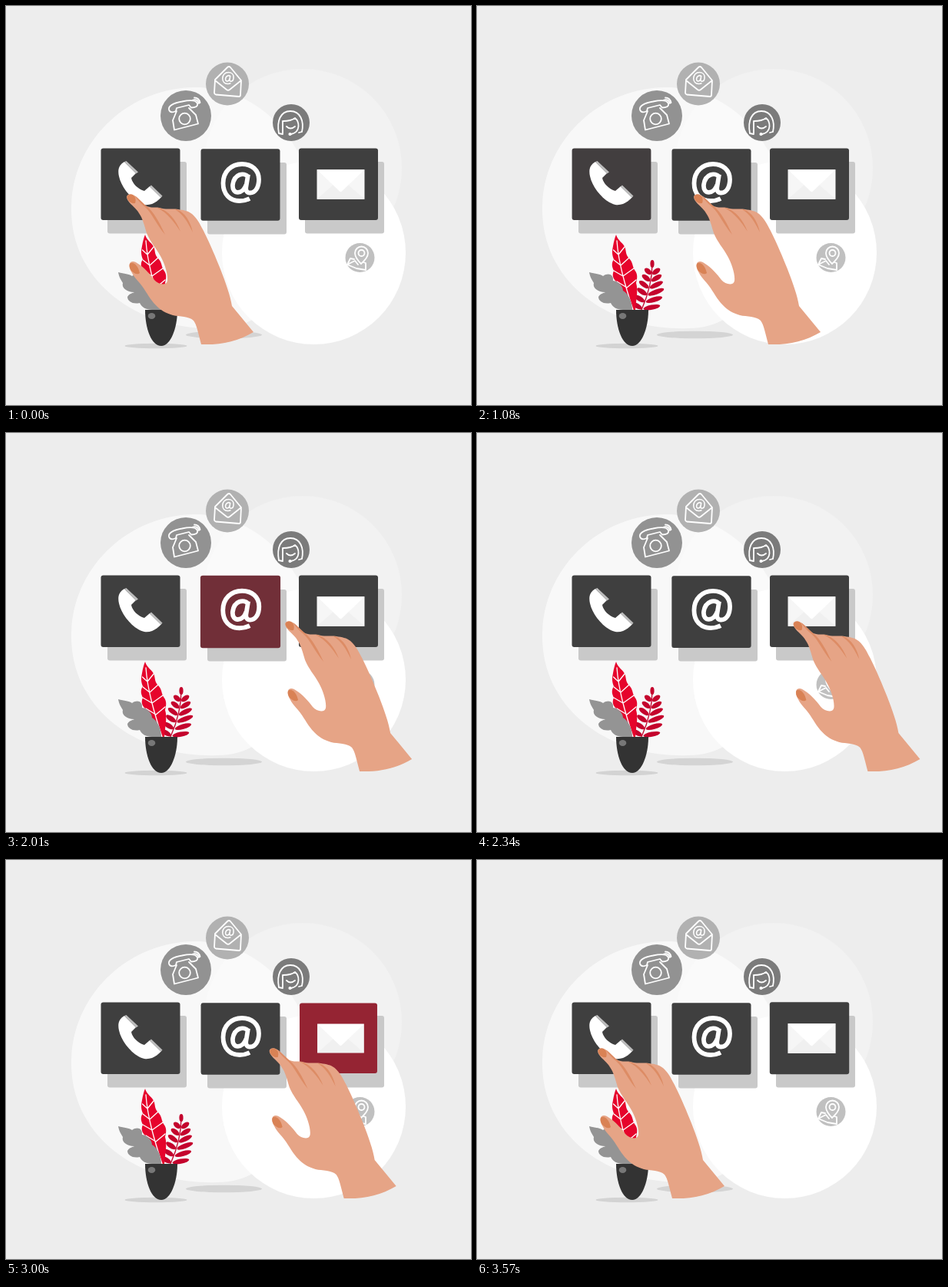
An HTML page that plays this animation: 605 by 520 pixels, repeating every 3.6 s.

```html
<!DOCTYPE html>
<html lang="en">
<head>
<meta charset="utf-8">
<title>Contact options</title>
<style>
html, body { margin: 0; width: 100%; height: 100%; overflow: hidden; background: #ededed; }
svg { display: block; }
.line { fill: none; stroke: #fff; stroke-width: 1.8; stroke-linecap: round; stroke-linejoin: round; }
.vein { stroke-width: 1.3; }
</style>
</head>
<body>
<svg width="605" height="520" viewBox="0 0 605 520">
  <defs>
    <path id="at" fill="none" stroke="#fff" d="M317 251C312 253.500 308 254 304 254C291 254 282.500 245 282.500 231C282.500 216 293 206 307 206C320 206 329 214 329 226C329 237 324 243.500 317.500 243.500C313 243.500 311.500 240 312.500 235L315 219.500M314.500 222C310 217 297 218 295 233C294 246.500 308 246 312.500 233"/>
  </defs>

  <!-- backdrop -->
  <circle cx="386" cy="211" r="129" fill="#f2f2f2"/>
  <path fill="#fff" opacity=".65" d="M85 265C85 175 160 106 247 106C325 106 385 170 397 240C400 340 350 420 275 420C175 424 85 362 85 265Z"/>
  <circle cx="400.500" cy="321.500" r="119.500" fill="#fff"/>

  <!-- contact badges -->
  <circle cx="234" cy="143" r="33" fill="#929292"/>
  <g class="line">
    <path d="M212 135C211 129 221 126 229 124.500C238 122.500 247 122 249 127C250 131 246 132.500 241 132.500L238 129L222 133L221 137C217 139 213 139 212 135ZM222 137L217 149L219 161.500L250 153.500L247 142L238 133M243 122.500Q249 121 251 127M245 119.500Q251 119.500 252.500 126"/>
    <circle cx="232.500" cy="147" r="7.300"/>
  </g>
  <circle cx="288" cy="101.500" r="28" fill="#b1b1b1"/>
  <g class="line">
    <path d="M272 96L288 80Q290 78 292 80L306 97L305 116Q305 118 303 118L273 115.500Q271 115 271 113ZM272 97L287 109Q289 110.500 291 109L306 97"/>
  </g>
  <use href="#at" stroke-width="5" transform="translate(289 94) scale(.31) translate(-306 -230)"/>
  <circle cx="371" cy="152" r="24" fill="#7b7b7b"/>
  <g class="line">
    <path d="M360 167L355 166C352 150 357 137 370 137C383 137 388 150 385 164L381 165M360 166V150Q371 150 376 146Q381 150 380.500 157C380 163 376 166 371 167M365 157Q370 162 376 157"/>
    <circle cx="369.500" cy="167" r="1.200" fill="#fff"/>
  </g>
  <circle cx="460.500" cy="328" r="19" fill="#c0c0c0"/>
  <g class="line">
    <path d="M462 336C457 331 454 327 454 322A8 8 0 0 1 471 322C471 327 467 331 462 336ZM453 330L448 329L444 337L456 342L468 344L468 335L465 334M444 337L454 332L458 337"/>
    <circle cx="462.500" cy="322" r="4"/>
  </g>

  <!-- card shadows -->
  <g fill="#c9c9c9">
    <rect x="132" y="203" width="103" height="93.500" rx="3"/>
    <rect x="262" y="204" width="103" height="93.500" rx="3"/>
    <rect x="389" y="203" width="103" height="93.500" rx="3"/>
  </g>

  <!-- cards -->
  <g class="card">
    <rect x="123.500" y="185.500" width="103" height="93.500" rx="3"/>
    <path fill="#fff" d="M154 203L169 218L163 224C164 231 172 239 180 241L187 235L202 249C195 257 188 260 180 259C166 256 150 237 147 222C145 213 147 207 154 203Z"/>
    <path fill="#bcbcbc" d="M154 203L156.500 202L172 216.500L169 218.500ZM186.500 235.500L189 233.500L203.500 247.500L201.500 250Z"/>
  </g>
  <g class="card">
    <rect x="253.500" y="186.300" width="103" height="93.500" rx="3"/>
    <use href="#at" stroke-width="5.800"/>
  </g>
  <g class="card">
    <rect x="381" y="185.500" width="103" height="93.500" rx="3"/>
    <rect x="404.500" y="213.300" width="62" height="38.400" fill="#f6f6f6"/>
    <path fill="#f0f0f0" d="M404.500 251.700L426 233H445L466.500 251.700Z"/>
    <path fill="#fff" d="M404.500 213.300H466.500L437 241.500Q435.500 243 434 241.500Z"/>
  </g>

  <!-- plant -->
  <ellipse cx="195" cy="443" rx="40.500" ry="3.300" fill="#d3d3d3"/>
  <ellipse cx="283.500" cy="428.500" rx="49.500" ry="4.800" fill="#d4d4d4"/>
  <g id="fern" fill="#c4042d"><path d="M228 336C228 358 222 378 214 396" fill="none" stroke="#c4042d" stroke-width="1.300"/></g>
  <path fill="#e6042c" d="M181 298C183 306 191 309 193 316C194 321 194 325 198 329C203 334 202 339 205 344C210 350 208 356 207 361C210 371 207 382 206 396H202C199 386 194 380 190 374C185 369 185 364 181 359C176 354 176 350 178 345C175 339 175 335 178 330C175 323 176 318 177 313C178 307 179 303 181 298Z"/>
  <path class="line vein" d="M182 306C184 335 193 365 203 396M184 324L177.500 318M184 324L192 314M187 338L178 331M187 338L198 328M190 352L178 345M190 352L204 342M195 367L182 359M195 367L207 357"/>
  <path fill="#949494" d="M146 347C154 349 160 349 164 352C171 347 178 350 177 358C184 359 190 365 190 371C197 375 202 385 202 396H190C182 396 176 392 174 387C165 389 158 385 158 379C160 375 165 374 167 373C157 373 150 367 152 361C149 356 147 353 146 347Z"/>
  <path fill="#333" d="M181 396H223C223 420 214 443 202 443C189 443 181 420 181 396Z"/>
  <ellipse cx="189.500" cy="404" rx="4.800" ry="4" fill="#777"/>

  <g id="hand">
    <path fill="#e6a486" d="M157 249C157 245 163 244 167 247C172 250 177 256 181 260C188 264 194 261.500 200 263C208 266 216 263.500 224 265C231 266 237 267 242 271C250 278 253 286 257 293C266 311 273 328 279 343C286 361 292 378 294 391L322 425C302 437 279 442 254 441C250 426 248 415 244 410C238 404 226 405 217 403C207 400 201 396 195 390C187 382 183 373 177 365C172 358 167 354 164 348C161 343 159 338 162 334C165 332 168 333 172 336C180 341 187 349 193 357C198 363 209 365 210 358C211 349 206 335 201 326C195 315 188 308 183 296C180 286 178 277 173 270C169 262 158 257 157 249Z"/>
    <path fill="#d98255" d="M157.500 249C158 245 164 244 167 248C169 250 169 254 168 257C163 258 158 254 157.500 249ZM161 336C165 332 172 338 174 348C171 351 166 348 163 345C161 342 160 339 161 336Z"/>
    <path fill="#dd8c65" d="M167 247C172 250 177 256 183 261C193 269 200 283 207 298C195 284 190 270 181 262C176 258 171 253 167 247ZM199 263C211 267 221 278 227 294C218 280 210 270 197 263ZM222 265C233 269 240 281 243 295C236 281 231 272 220 265Z"/>
  </g>
</svg>
<script>
const LOOP = 3600, STEP = 30, HOLD = 300;
const RELEASES = [300, 1500, 2700];
const CENTERS = [[175, 232], [305, 233], [432.5, 232]];
const STOPS = [0, 131.4, 256, 0];
const TRAVEL = [900, 900, 870];
const DARK = [63, 63, 63], RED = [200, 20, 44];
const cards = document.querySelectorAll('.card');
const hand = document.getElementById('hand');
const clamp = v => Math.min(1, Math.max(0, v));
const ease = u => u * u * (3 - 2 * u);

function growFern() {
  let leaves = '<ellipse cx="228" cy="336" rx="2.600" ry="5"/>';
  for (let i = 0; i < 6; i++) {
    const x = 227.5 - i * 1.3 - i * i * 0.22, y = 350 + i * 9;
    for (const side of [-1, 1]) {
      const size = side < 0 ? 5.5 + Math.min(i, 2) : 6 + Math.min(i, 3) * 1.7;
      const angle = side < 0 ? 40 - i * 2 : -36 + i * 5;
      leaves += `<ellipse cx="${side * (size + 1)}" rx="${size}" ry="3.200" transform="translate(${x} ${y}) rotate(${angle})"/>`;
    }
  }
  document.getElementById('fern').insertAdjacentHTML('beforeend', leaves);
}

// Dips while pressed, then rings out like a spring.
function pressScale(age) {
  if (age < -HOLD) return 1;
  if (age < 0) return 0.9 + 0.1 * Math.abs(age + HOLD / 2) / (HOLD / 2);
  return 1 + 0.045 * Math.exp(-age * 0.0027) * Math.sin(age * Math.PI / 200);
}

function redness(age) {
  return age < 0 ? clamp(1 + age / HOLD) : clamp(1 - age / 800);
}

function draw(time) {
  const t = Math.floor(time % LOOP / STEP) * STEP;
  let x = 0;
  RELEASES.forEach((release, i) => {
    const age = t - release;
    x += (STOPS[i + 1] - STOPS[i]) * ease(clamp(age / TRAVEL[i]));
    const [cx, cy] = CENTERS[i], mix = redness(age);
    cards[i].setAttribute('transform', `translate(${cx} ${cy}) scale(${pressScale(age)}) translate(${-cx} ${-cy})`);
    const color = DARK.map((c, k) => Math.round(c + (RED[k] - c) * mix));
    cards[i].firstElementChild.setAttribute('fill', `rgb(${color})`);
  });
  hand.setAttribute('transform', `translate(${x} 0)`);
}

growFern();
const start = performance.now();
(function tick() {
  draw(performance.now() - start);
  requestAnimationFrame(tick);
})();
</script>
</body>
</html>
```
